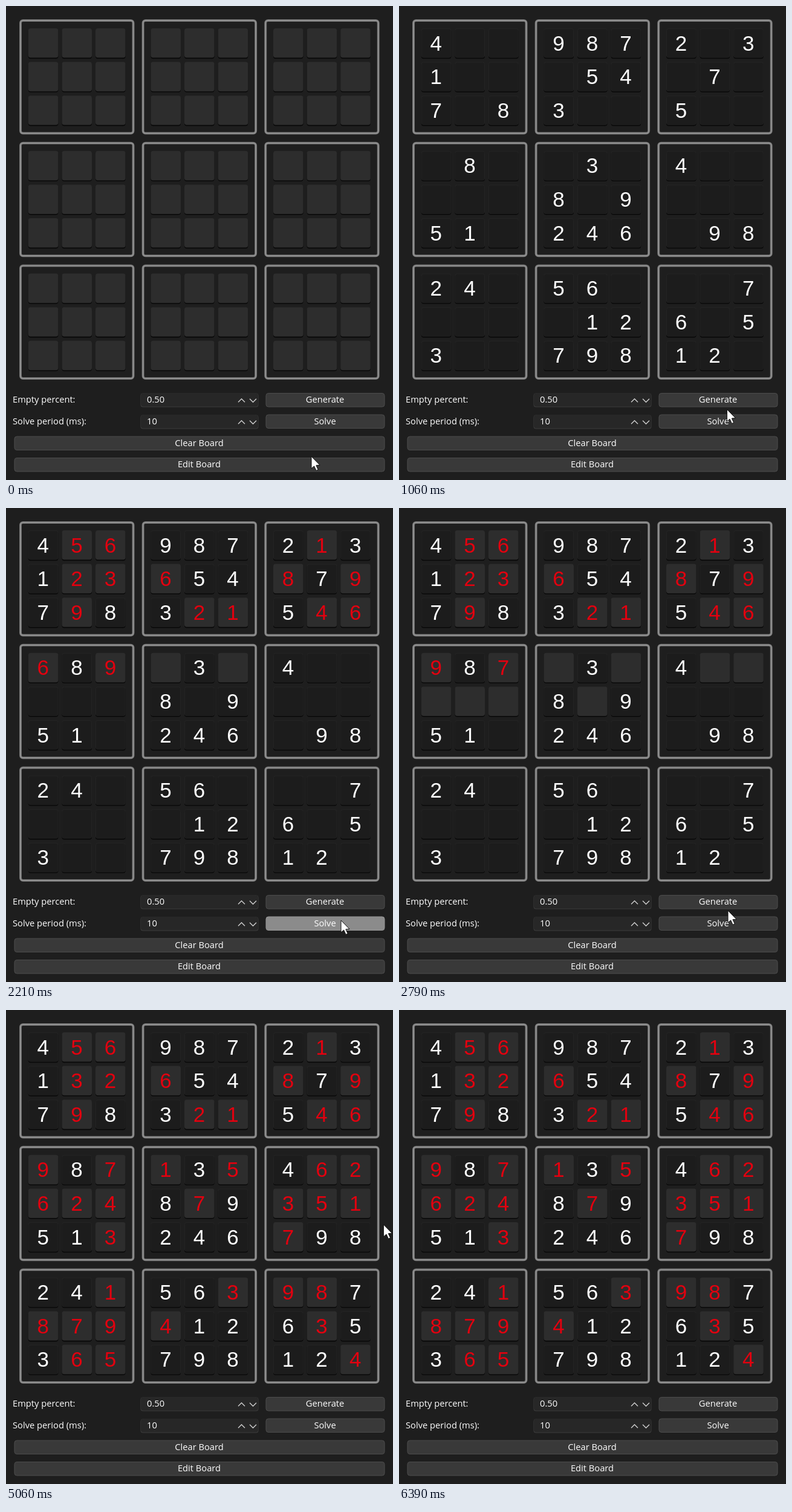
An HTML page with a canvas that plays this animation: 640 by 784 pixels, repeating every 6420 ms.

```html
<!DOCTYPE html>
<html lang="en">
<head>
<meta charset="utf-8">
<title>Sudoku solver</title>
<style>
  html, body { margin: 0; width: 100%; height: 100%; overflow: hidden; background: #1e1e1e; }
  canvas { display: block; }
</style>
</head>
<body>
<canvas id="stage" width="640" height="784"></canvas>
<script>
const ctx = document.getElementById('stage').getContext('2d');
const LOOP = 6420;
const GENERATE_AT = 640;
const SOLVE_AT = 1755;
const OP_MS = 16.3;
const UI_FONT = '14.7px "Open Sans", "Noto Sans", sans-serif';
const DIGIT_FONT = '35px "Liberation Sans", Arial, sans-serif';

const puzzle = [
  '4..9872.3', '1...54.7.', '7.83..5..',
  '.8..3.4..', '...8.9...', '51.246.98',
  '24.56...7', '....126.5', '3..79812.'
].join('').split('').map(c => +c || 0);

const buttons = [
  { text: 'Generate', x: 430, y: 640, w: 196 },
  { text: 'Solve', x: 430, y: 675.5, w: 196 },
  { text: 'Clear Board', x: 14, y: 711.5, w: 612 },
  { text: 'Edit Board', x: 14, y: 747, w: 612 }
];
const BUTTON_H = 23;

// time, x, y of the pointer tip
const pointer = [
  [0, 505, 745], [60, 505, 745], [240, 516, 708], [430, 532, 664],
  [580, 534, 661], [900, 536, 658], [1250, 550, 678], [1670, 554, 682],
  [2560, 554, 682], [2790, 544, 666], [2900, 547, 650], [3150, 560, 590],
  [3360, 592, 520], [3520, 660, 450], [4980, 660, 362], [5060, 624, 355],
  [5160, 664, 346], [LOOP, 664, 346]
];

function fits(board, pos, n) {
  const r = Math.floor(pos / 9), c = pos % 9;
  const top = r - r % 3, left = c - c % 3;
  for (let i = 0; i < 9; i++) {
    const box = (top + Math.floor(i / 3)) * 9 + left + i % 3;
    if (board[r * 9 + i] === n || board[i * 9 + c] === n || board[box] === n) return false;
  }
  return true;
}

// Backtracking solver that records every write to the board
function trace() {
  const board = puzzle.slice(), ops = [];
  const write = (pos, n) => { board[pos] = n; ops.push([pos, n]); };
  (function solve() {
    const pos = board.indexOf(0);
    if (pos < 0) return true;
    for (let n = 1; n <= 9; n++) {
      if (!fits(board, pos, n)) continue;
      write(pos, n);
      if (solve()) return true;
      write(pos, 0);
    }
    return false;
  })();
  return ops;
}
const ops = trace();

function boardAt(t) {
  if (t < GENERATE_AT) return { digits: Array(81).fill(0), lit: Array(81).fill(true) };
  const digits = puzzle.slice(), lit = Array(81).fill(false);
  const count = Math.max(0, Math.min(ops.length, Math.floor((t - SOLVE_AT) / OP_MS)));
  for (const [pos, n] of ops.slice(0, count)) {
    digits[pos] = n;
    lit[pos] = true;
  }
  return { digits, lit };
}

function pointerAt(t) {
  const i = Math.max(1, pointer.findIndex(p => p[0] > t));
  const [t0, x0, y0] = pointer[i - 1], [t1, x1, y1] = pointer[i];
  const k = (t - t0) / (t1 - t0);
  return { x: x0 + (x1 - x0) * k, y: y0 + (y1 - y0) * k };
}

function box(x, y, w, h, r, fill, stroke, line = 1) {
  ctx.beginPath();
  ctx.roundRect(x, y, w, h, r);
  if (fill) { ctx.fillStyle = fill; ctx.fill(); }
  if (stroke) { ctx.strokeStyle = stroke; ctx.lineWidth = line; ctx.stroke(); }
}

function label(text, x, y, align = 'left') {
  ctx.font = UI_FONT;
  ctx.textAlign = align;
  ctx.fillStyle = '#fff';
  ctx.fillText(text, x, y);
}

function drawCell(pos, digit, lit) {
  const r = Math.floor(pos / 9), c = pos % 9;
  const x = 36.8 + Math.floor(c / 3) * 202.6 + c % 3 * 55.6;
  const y = 37 + Math.floor(r / 3) * 202.8 + r % 3 * 55.6;
  box(x, y + 1, 49.6, 49.2, 4, '#080808');
  box(x, y, 49.6, 48.6, 4, lit ? '#2d2d2d' : '#242424');
  if (!lit) box(x + 1, y + 1, 47.6, 47.4, 3, '#1c1c1c');
  if (!digit) return;
  ctx.font = DIGIT_FONT;
  ctx.textAlign = 'center';
  ctx.fillStyle = puzzle[pos] ? '#fff' : '#e2000f';
  ctx.fillText(digit, x + 24.5, y + 36.6);
}

function drawBoard(t) {
  for (let i = 0; i < 9; i++) {
    const x = 24 + i % 3 * 202.6, y = 24 + Math.floor(i / 3) * 202.8;
    box(x, y, 186.5, 186.5, 4, null, '#686868', 4);
    box(x, y, 186.5, 186.5, 4, null, '#8e8e8e', 2.4);
  }
  const { digits, lit } = boardAt(t);
  digits.forEach((d, pos) => drawCell(pos, d, lit[pos]));
}

function chevron(x, y, dir) {
  ctx.beginPath();
  ctx.moveTo(x - 5.5, y + 2.7 * dir);
  ctx.lineTo(x, y - 2.7 * dir);
  ctx.lineTo(x + 5.5, y + 2.7 * dir);
  ctx.strokeStyle = '#cfcfcf';
  ctx.lineWidth = 1.4;
  ctx.stroke();
}

function drawSpin(name, value, y) {
  label(name, 11, y + 16.2);
  box(222.5, y + 0.5, 195, 23, 4, '#3c3c3c');
  box(223, y + 0.5, 194, 22, 4, '#272727');
  label(value, 233, y + 16.2);
  chevron(389.5, y + 12.5, 1);
  chevron(408.5, y + 12.5, -1);
}

function drawButton(b, p) {
  const over = p.x >= b.x && p.x <= b.x + b.w && p.y >= b.y && p.y <= b.y + BUTTON_H;
  box(b.x, b.y + 0.5, b.w, BUTTON_H - 0.5, 4, over ? '#8b8b8b' : '#393939', over ? '#959595' : '#4c4c4c');
  label(b.text, b.x + b.w / 2 - 0.5, b.y + 16.3, 'center');
}

function drawPointer({ x, y }) {
  const shape = [[0, 0], [0, 20], [4.6, 16], [8, 23.4], [11.2, 22], [7.9, 14.8], [14, 14.4]];
  ctx.beginPath();
  shape.forEach(([dx, dy]) => ctx.lineTo(x + dx, y + dy));
  ctx.closePath();
  ctx.fillStyle = '#fff';
  ctx.fill();
  ctx.strokeStyle = '#111';
  ctx.lineWidth = 1;
  ctx.stroke();
}

function draw(t) {
  ctx.fillStyle = '#1e1e1e';
  ctx.fillRect(0, 0, 640, 784);
  const p = pointerAt(t);
  drawBoard(t);
  drawSpin('Empty percent:', '0.50', 640);
  drawSpin('Solve period (ms):', '10', 676);
  buttons.forEach(b => drawButton(b, p));
  drawPointer(p);
}

const start = performance.now();
function tick() {
  draw((performance.now() - start) % LOOP);
  requestAnimationFrame(tick);
}
tick();
</script>
</body>
</html>
```
